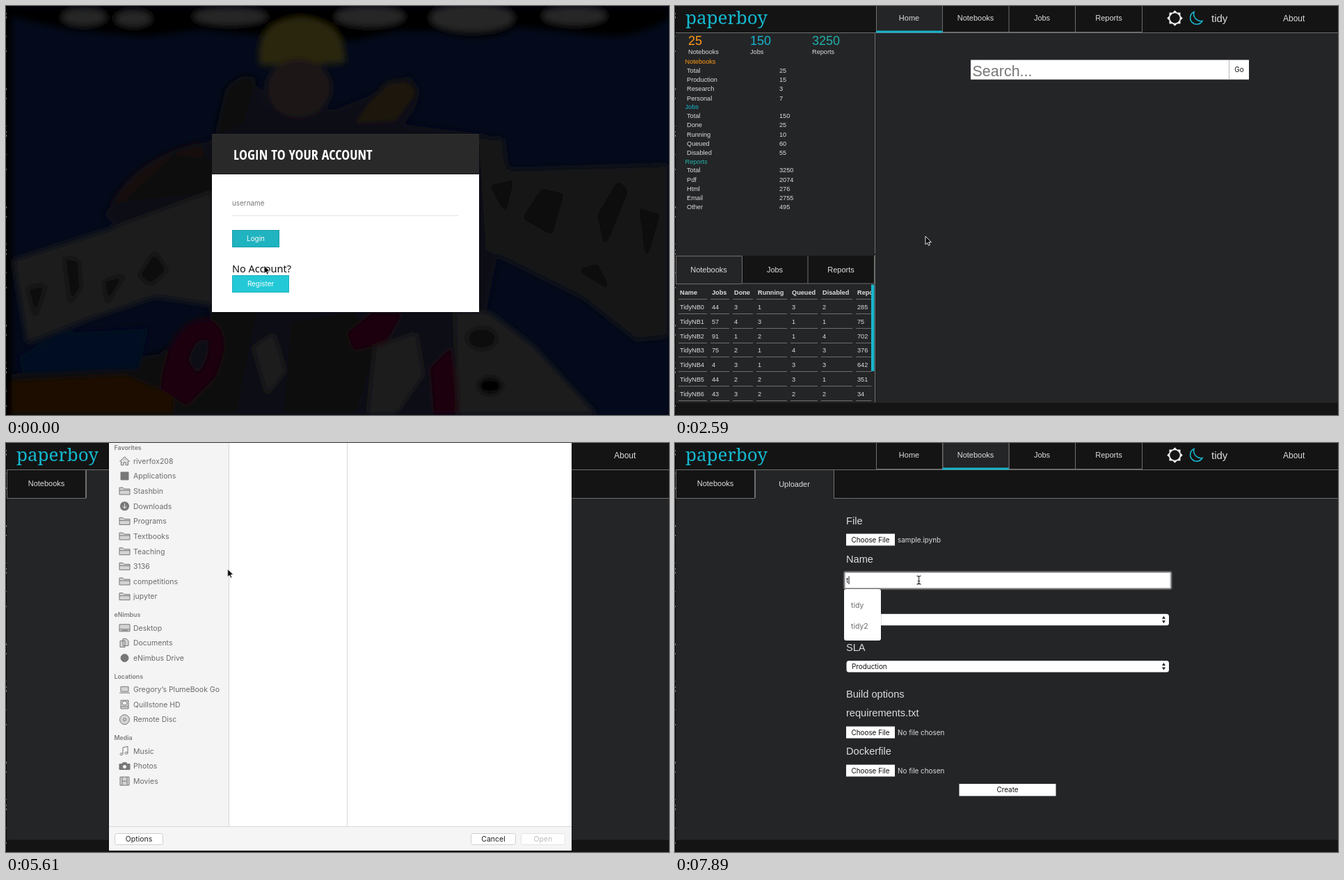
These frames come from a looping animation (953 px wide and 588 px high, 8000 ms). An HTML page:

```html
<!DOCTYPE html>
<html lang="en">
<head>
<meta charset="utf-8">
<title>Notebook uploader</title>
<style>
html, body { margin: 0; width: 100%; height: 100%; overflow: hidden; background: #242527; }
svg { display: block; width: 953px; height: 588px; }
text { font: 11px "Liberation Sans", Arial, sans-serif; fill: #ddd; }
.ui { font: 9.9px Inter, Roboto, sans-serif; fill: #111; }
.mid { text-anchor: middle; }
.end { text-anchor: end; }
.title { font: 300 20px "Open Sans Condensed", "Open Sans", sans-serif; font-stretch: 75%; fill: #fff; }
.ask { font: 14.5px "Noto Sans", "Open Sans", sans-serif; fill: #111; }
.brand { font: 500 26px "Noto Serif", serif; fill: #14b8d0; }
.s9 { font-size: 9.2px; }
.s15 { font-size: 14.6px; }
.side { font: 10.5px Inter, sans-serif; fill: #6b6b6b; }
.head { font: 600 8.8px Inter, sans-serif; fill: #7d7d7d; }
.file { font: 9.7px Inter, sans-serif; fill: #222; }
.code { font: 9.2px "DejaVu Sans Mono", monospace; fill: #111; }
.white { fill: #fff; }
.grey { fill: #777; }
.line { fill: none; stroke: #6e6e6e; }
.icon { fill: #d2d2d2; stroke: #777; stroke-width: 1; }

/* 1% = 80 ms; every change is a hard cut */
.a { animation: 8s step-end infinite; }
#login { animation-name: login; }
#register { animation-name: register; }
#filled { animation-name: filled; }
#hint { animation-name: hint; }
#app { animation-name: app; }
#home { animation-name: home; }
#notebooks { animation-name: notebooks; }
#tab { animation-name: tab; }
#subtab { animation-name: subtab; }
#form { animation-name: form; }
#ring { animation-name: ring; }
#nofile { animation-name: nofile; }
#picked { animation-name: picked; }
#typed { animation-name: typed; }
#sheet { animation-name: sheet; }
.loaded { animation-name: loaded; }
#cursor { animation-name: cursor; }
#arrow { animation-name: arrow; }
#beam { animation-name: beam; }
@keyframes login { 0% { opacity: 1 } 4.125%, to { opacity: 0 } }
@keyframes register { 0% { opacity: 0 } 4.125%, to { opacity: 1 } }
@keyframes filled { 0% { opacity: 0 } 15.25%, to { opacity: 1 } }
@keyframes hint { 0% { opacity: 0 } 13.5% { opacity: 1 } 19%, to { opacity: 0 } }
@keyframes app { 0% { opacity: 0 } 30.125%, to { opacity: 1 } }
@keyframes home { 0% { opacity: 1 } 42.375%, to { opacity: 0 } }
@keyframes notebooks { 0% { opacity: 0 } 42.375%, to { opacity: 1 } }
@keyframes tab { 0% { transform: none } 42.375%, to { transform: translate(95.5px, 0) } }
@keyframes subtab { 0% { transform: none } 55.5%, to { transform: translate(114px, 0) } }
@keyframes form { 0% { opacity: 0 } 55.5%, to { opacity: 1 } }
@keyframes ring { 0% { opacity: 0 } 64.625% { opacity: 1 } 98.625%, to { opacity: 0 } }
@keyframes nofile { 0% { opacity: 1 } 85.625%, to { opacity: 0 } }
@keyframes picked { 0% { opacity: 0 } 85.625%, to { opacity: 1 } }
@keyframes typed { 0% { opacity: 0 } 98.625%, to { opacity: 1 } }
@keyframes sheet {
  0% { transform: translate(0, -620px) }
  68.375% { transform: translate(0, -330px) }
  70.125% { transform: none }
  83.75% { transform: translate(0, -26.5px) }
  85.625%, to { transform: translate(0, -620px) }
}
@keyframes loaded { 0% { opacity: 0 } 72%, to { opacity: 1 } }
@keyframes arrow { 0% { opacity: 1 } 11.625% { opacity: 0 } 15.25% { opacity: 1 } 89.375%, to { opacity: 0 } }
@keyframes beam { 0% { opacity: 0 } 11.625% { opacity: 1 } 15.25% { opacity: 0 } 89.375%, to { opacity: 1 } }
@keyframes cursor {
  0% { transform: translate(371px, 373px) }
  1.875% { transform: translate(371px, 393px) }
  9.75% { transform: translate(364px, 345px) }
  11.625% { transform: translate(352px, 286px) }
  15.25% { transform: translate(348px, 320px) }
  20.875% { transform: translate(354px, 328px) }
  22.75% { transform: translate(359px, 333px) }
  26.375% { transform: translate(360px, 331px) }
  34.5% { transform: translate(372px, 262px) }
  36.625% { transform: translate(402px, 136px) }
  38.625% { transform: translate(426px, 40px) }
  40.5% { transform: translate(432px, 20px) }
  44.25% { transform: translate(402px, 28px) }
  46.125% { transform: translate(318px, 44px) }
  48.125% { transform: translate(236px, 54px) }
  50% { transform: translate(188px, 59px) }
  51.875% { transform: translate(174px, 61px) }
  57.375% { transform: translate(204px, 82px) }
  59.25% { transform: translate(256px, 124px) }
  61% { transform: translate(284px, 144px) }
  68.375% { transform: translate(301px, 162px) }
  70.125% { transform: translate(318.5px, 181px) }
  72% { transform: translate(326px, 186px) }
  73.875% { transform: translate(331px, 187px) }
  87.5% { transform: translate(338px, 190px) }
  89.375% { transform: translate(346px, 195px) }
  91.25%, to { transform: translate(350.5px, 197px) }
}
</style>
</head>
<body>
<svg viewBox="0 0 953 588">
<defs>
  <filter id="blur" x="-5%" y="-5%" width="110%" height="110%"><feGaussianBlur stdDeviation="5"/></filter>
  <filter id="glow" x="-10%" y="-60%" width="120%" height="220%"><feGaussianBlur stdDeviation="1"/></filter>
  <linearGradient id="dark" x2="0" y2="1"><stop stop-color="#7c7c7e"/><stop offset="1" stop-color="#5c5c5f"/></linearGradient>
  <clipPath id="tableClip"><path d="M1 400H282.500V570H1z"/></clipPath>
  <clipPath id="codeClip"><path d="M508 0H796V278H508z"/></clipPath>
  <g id="menu">
    <rect x="-.5" y="-.5" width="54" height="75" rx="3.500" fill="#000" opacity=".25"/>
    <rect width="53" height="74" rx="3" fill="#fff"/>
    <text class="side" x="10" y="26.700">tidy</text>
    <text class="side" x="10" y="56.700">tidy2</text>
  </g>
  <g id="card">
    <path d="M296 184h384v256H296z" fill="#fff"/>
    <path d="M296 184h384v58H296z" fill="#292929"/>
    <path d="M296 184.500h384" stroke="#343434"/>
    <path d="M296 241.500h384" stroke="#171114"/>
    <path d="M325 301.500h326" stroke="#e4e4e4"/>
    <text class="ui grey" x="325" y="286.500">username</text>
  </g>
  <g id="loginBtn">
    <path d="M325 0h68v25h-68z" fill="#20b3c0"/><path d="M325.500 .5h67v24h-67z" fill="none" stroke="#1a9fac"/>
    <text class="ui white mid" x="359" y="16.200">Login</text>
  </g>
  <g id="regBtn">
    <path d="M325 0h82v25h-82z" fill="#23c9d7"/><path d="M325.500 .5h81v24h-81z" fill="none" stroke="#1fb2bf"/>
    <text class="ui white mid" x="366" y="16.200">Register</text>
  </g>
</defs>

<!-- dim backdrop -->
<path d="M0 0h953v588H0z" fill="#040a1b"/>
<g filter="url(#blur)">
  <path d="M0 0H953V18Q900 50 850 42L735 30Q690 56 620 36L560 36 500 50 360 42 280 34 200 44 90 34 0 14z" fill="#040404"/>
  <g fill="#272727">
    <ellipse cx="112" cy="16" rx="32" ry="12"/><ellipse cx="183" cy="18" rx="26" ry="11"/>
    <ellipse cx="322" cy="15" rx="53" ry="12"/><ellipse cx="523" cy="15" rx="50" ry="14"/>
    <ellipse cx="670" cy="17" rx="60" ry="20"/><ellipse cx="817" cy="14" rx="46" ry="13"/>
  </g>
  <path d="M300 190 325 130Q360 90 375 140L470 150 520 130 580 100Q610 130 570 170L690 185 730 240 690 440 650 588H330L290 430 140 300 190 240z" fill="#0f1015"/>
  <path d="M300 185 315 120Q340 90 360 105L340 170z" fill="#080809"/>
  <path d="M365 85Q355 20 425 16 490 22 487 82L440 84z" fill="#292607"/>
  <ellipse cx="421" cy="118" rx="47" ry="42" fill="#1b1413"/>
  <path d="M500 168 545 112Q575 98 590 125L560 165z" fill="#1c1411"/>
  <path d="M150 285Q190 215 280 196L296 260z" fill="#17090c"/>
  <path d="M170 280 240 215 296 220V270z" fill="#0c0c11"/>
  <path d="M10 365 150 320 296 266V430L215 418 120 450 30 485z" fill="#1b1b1a"/>
  <path d="M83 360 105 366 108 405 92 430z M190 388 213 352 233 380 208 402z M30 405 58 400 42 450z M140 395 172 385 145 430z" fill="#070707"/>
  <path d="M680 190 715 190 720 235 953 228V475L905 480 830 420 690 350z" fill="#191918"/>
  <path d="M695 258 730 250 718 300z M770 262 802 270 785 330 742 305z M850 300 880 250 895 265 860 350z M910 290 940 300 920 370z M820 380 850 370 870 410z" fill="#090909"/>
  <path d="M0 530 95 520 220 500 300 440H360L330 588H0z" fill="#0d090a"/>
  <path d="M18 505 75 470 205 464 190 522 25 528z" fill="#050d20"/>
  <path d="M0 540 170 530 240 560V588H0z" fill="#1b0806"/>
  <path d="M222 550Q235 445 292 450 330 470 300 535L260 575z" fill="#1d0608"/>
  <path d="M262 510Q270 475 290 480 295 505 275 530z" fill="#080a12"/>
  <path d="M355 490 385 470 402 525 375 560z" fill="#1b1b1b"/>
  <path d="M410 455 500 440 530 500 500 588H400z" fill="#0a0a0b"/>
  <path d="M490 470 525 442 570 442 545 485 500 495z M610 520 640 490 655 588H615z" fill="#1c0507"/>
  <path d="M530 490 590 470 600 530 560 588H520z" fill="#1d1d1c"/>
  <path d="M645 440H695L760 490 850 588H650z" fill="#1c1c1b"/>
  <ellipse cx="696" cy="546" rx="17" ry="12" fill="#050505"/><ellipse cx="684" cy="478" rx="22" ry="16" fill="#0b0b0b"/>
  <path d="M-10-10H8V600H-10z" fill="#020204"/>
</g>

<g id="login" class="a">
  <use href="#card"/>
  <text class="title" x="327" y="221">LOGIN TO YOUR ACCOUNT</text>
  <use href="#loginBtn" y="322"/>
  <text class="ask" x="325" y="383">No Account?</text>
  <use href="#regBtn" y="387"/>
</g>
<g id="register" class="a">
  <use href="#card"/>
  <text class="title" x="327" y="221">REGISTER</text>
  <g id="filled" class="a">
    <path d="M325 272h324.500v29H325z" fill="#f9fdbb"/>
    <text class="ui" x="325" y="286.500">tidy</text>
  </g>
  <use href="#regBtn" y="322"/>
  <text class="ask" x="325" y="383">Already have an account?</text>
  <use href="#loginBtn" y="387"/>
  <g id="hint" class="a"><use href="#menu" x="324" y="303"/></g>
</g>

<g id="app" class="a">
  <path d="M0 0h953v588H0z" fill="#242527"/>
  <path d="M0 0h953v38H0zM0 570.500h953V588H0z" fill="#141414"/>
  <path class="line" d="M1 38.500H953M289.500 0V37.500H671.500V0M384.500 0V37M480 0V37M575.500 0V37"/>
  <g id="tab" class="a">
    <path d="M290 0h94v37h-94z" fill="#242527"/><path d="M289.500 0V37M384.500 0V37" class="line"/>
    <path d="M289 35.500h95.500v3H289z" fill="#18b5cc"/>
  </g>
  <text class="brand" x="15" y="25.500">paperboy</text>
  <g class="mid">
    <text x="336.500" y="21">Home</text><text x="432" y="21">Notebooks</text>
    <text x="527.500" y="21">Jobs</text><text x="623.500" y="21">Reports</text>
  </g>
  <g transform="translate(718.500 17.500)" fill="#eee" fill-rule="evenodd">
    <path d="M0-11.300 3.300-8H8v4.700L11.300 0 8 3.300V8H3.300L0 11.300-3.300 8H-8V3.300L-11.300 0-8-3.300V-8h4.700zM-7.200 0a7.200 7.200 0 1 0 14.400 0 7.200 7.200 0 1 0-14.400 0z"/>
  </g>
  <path d="M746 8.500A9.300 9.300 0 1 0 758 21.500 10.500 10.500 0 0 1 746 8.500z" fill="none" stroke="#18b5cc" stroke-width="1.600"/>
  <text x="771" y="22.500" style="font-size:15px">tidy</text>
  <text x="874" y="21.500" style="font-size:12px">About</text>

  <g id="home" class="a">
    <path class="line" d="M287.500 39V356M287.500 358V570"/>
    <g id="stats"></g>
    <path d="M1 359h286v40.500H1z" fill="#141414"/>
    <path d="M1 359h95v41H1z" fill="#242527"/>
    <path class="line" d="M1.500 399V359.500H96.500V399H286.500V359M191 359V399M1 399.500H96"/>
    <g class="mid">
      <text x="48.500" y="383">Notebooks</text><text x="143.500" y="382.500">Jobs</text><text x="238.500" y="382.500">Reports</text>
    </g>
    <g id="table" clip-path="url(#tableClip)"></g>
    <path d="M282 400.500h4.500V525H282z" fill="#18b5cc"/>
    <path d="M425 77.500h400V105.500H425z" fill="#fff"/>
    <path d="M796.500 78V105.500M425 105.500H825" stroke="#b5b5b5"/>
    <text class="grey" x="427.500" y="101" style="font-size:21.500px">Search...</text>
    <text class="ui mid" x="811" y="95">Go</text>
  </g>

  <g id="notebooks" class="a">
    <path d="M1 39h952v40H1z" fill="#141414"/>
    <path class="line" d="M1.500 39V79.500H953M114.500 39V79M228.500 39V79"/>
    <g id="subtab" class="a">
      <path d="M1 39h113v42H1z" fill="#242527"/><path class="line" d="M1.500 39V79M114.500 39V79"/>
    </g>
    <g class="mid"><text x="58" y="61.800">Notebooks</text><text x="171.500" y="62.500">Uploader</text></g>
    <g id="form" class="a">
      <g id="ring" class="a"><rect x="244.500" y="128.500" width="73.500" height="21" rx="2" fill="#8a8a8a" filter="url(#glow)"/></g>
      <g id="fields"></g>
      <text id="nofile" class="ui a" x="320" y="142.700" style="fill:#ddd">No file chosen</text>
      <text id="picked" class="ui a" x="320" y="142.700" style="fill:#ddd">sample.ipynb</text>
      <path d="M244 186h468.500v23H244z" fill="#fff"/><path d="M244 208.500h468.500" stroke="#bbb"/>
      <text class="ui grey" x="246" y="200.700">Name for Notebook...</text>
      <g id="typed" class="a">
        <rect x="243" y="185" width="470.500" height="25" rx="1" fill="#b5b5b5" filter="url(#glow)"/>
        <path d="M245 187h466.500v21H245z" fill="#fff"/>
        <text class="ui" x="246" y="200.700">t</text><path d="M250 191.500V203" stroke="#111"/>
        <use href="#menu" x="243" y="210"/>
      </g>
    </g>
  </g>
</g>

<g id="sheet" class="a">
  <path d="M147-40H814V587H147z" fill="#000" opacity=".35"/>
  <path d="M148-40H813V586H148z" fill="#fff"/>
  <path d="M148-40H320V551H148z" fill="#f4f4f4"/>
  <path class="a loaded" d="M148-40H320V551H148z" fill="#e3e7e7"/>
  <path d="M148 551H813V586H148z" fill="#f5f5f5"/>
  <path d="M148 551.500H813M320.500-40V551M490.500-40V551" stroke="#d8d8d8"/>
  <g id="side"></g>
  <g fill="#fff" stroke="#cfcfcf">
    <rect x="156.500" y="561.500" width="69" height="16" rx="3"/><rect x="668.500" y="561.500" width="64" height="16" rx="3"/>
    <rect x="740.500" y="561.500" width="63" height="16" rx="3" stroke="#e2e2e2"/>
  </g>
  <g class="mid">
    <text class="side" x="191" y="573.300" style="fill:#222">Options</text>
    <text class="side" x="700.500" y="573.300" style="fill:#222">Cancel</text>
    <text class="side" x="772" y="573.300" style="fill:#bbb">Open</text>
  </g>
  <g class="a loaded">
    <rect x="740" y="561" width="64" height="17" rx="3" fill="url(#dark)"/>
    <text class="side mid white" x="772" y="573.300">Open</text>
    <path d="M162 61h17v16h-17z" fill="#e3e7e7"/><path d="M165 63.500h11v11h-11z" fill="#777"/>
    <g id="files"></g>
    <path d="M508.500-40V278.500H795.500V-40" fill="none" stroke="#c4c4c4"/>
    <g id="code" clip-path="url(#codeClip)"></g>
    <text class="file mid" x="652" y="314.500" style="font-size:12.600px">sample.ipynb</text>
    <text class="file mid" x="652" y="331" style="font-weight:500;fill:#8a8a8a">Limpid Text Document - 214 KB</text>
    <g id="info"></g>
  </g>
</g>

<path d="M0 0h1v588H0z" fill="#050505"/>
<path d="M.5 10V588" stroke="#777" stroke-dasharray="2 3 3 25 1 20 2 52 3 11 2 38 1 7"/>

<g id="cursor" class="a">
  <path id="arrow" class="a" d="M0 0V11.800L2.700 9.300 4.400 13.300 6.400 12.400 4.700 8.500H8.300z" fill="#000" stroke="#fff" stroke-width=".9"/>
  <path id="beam" class="a" d="M-3-6Q0-6 0-4 0-6 3-6M0-4V4M-3 6Q0 6 0 4 0 6 3 6M-1.500 1.500h3" fill="none" stroke="#111" stroke-width="1.100"/>
</g>
</svg>

<script>
const put = (id, html) => document.getElementById(id).innerHTML = html;
const text = (x, y, s, cls = "", style = "") => `<text x="${x}" y="${y}" class="${cls}" style="${style}">${s}</text>`;
const path = (d, attrs) => `<path d="${d}" ${attrs}/>`;

// summary panel
const groups = [
  ["Notebooks", "#ff9a16", 19, 83, "Total 25 Production 15 Research 3 Personal 7"],
  ["Jobs", "#18b5cc", 108, 148.200, "Total 150 Done 25 Running 10 Queued 60 Disabled 55"],
  ["Reports", "#22b0aa", 197, 226.500, "Total 3250 Pdf 2074 Html 276 Email 2755 Other 495"]
];
put("stats", groups.map(([name, color, x, y, list]) => {
  const words = list.split(" ");
  let out = text(x, 56, words[1], "", `font-size:18px;fill:${color}`) + text(x, 69.300, name, "s9")
    + text(14.500, y, name, "s9", `fill:${color}`);
  for (let i = 0; i < words.length; i += 2) {
    const row = y + 12.700 + i / 2 * 13.300;
    out += text(17, row, words[i], "s9") + text(150, row, words[i + 1], "s9");
  }
  return out;
}).join(""));

// notebook table
const cols = [7, 53, 85, 119, 168, 212, 262, 306];
const rows = ["Name Jobs Done Running Queued Disabled Reports", "44 3 1 3 2 285", "57 4 3 1 1 75",
  "91 1 2 1 4 702", "75 2 1 4 3 376", "4 3 1 3 3 642", "44 2 2 3 1 351", "43 3 2 2 2 34"];
put("table", rows.map((row, i) => {
  const cells = (i ? `TidyNB${i - 1} ` : "") + row;
  const y = 415.200 + i * 20.800;
  return cells.split(" ").map((s, c) => text(cols[c], y, s, "s9", i ? "" : "font-weight:bold")
    + path(`M${cols[c] - 2} ${Math.round(y + 6) + .5}H${cols[c + 1] - 7}`, 'class="line"')).join("");
}).join(""));

// upload form
const labels = [[117, "File"], [172, "Name"], [232, "Privacy"], [299, "SLA"],
  [366, "Build options"], [393, "requirements.txt"], [448, "Dockerfile"]];
const chooser = y => path(`M246 ${y}h70v17h-70z`, 'fill="#fff"') + text(281, y + 12.200, "Choose File", "ui mid")
  + (y > 200 ? text(320, y + 12.200, "No file chosen", "ui", "fill:#ddd") : "");
const select = (y, s) => `<rect x="246.500" y="${y}" width="463.500" height="16.500" rx="3.500" fill="#fff"/>`
  + text(254, y + 11.700, s, "ui") + path(`M700 ${y + 7}l2.500-4 2.500 4zM700 ${y + 9.500}l2.500 4 2.500-4z`, 'fill="#222"');
put("fields", labels.map(([y, s]) => text(246, y, s, "s15")).join("")
  + [130.500, 407.500, 462.500].map(chooser).join("") + select(245.700, "Private") + select(313, "Production")
  + path("M408.500 490h139v17.500h-139z", 'fill="#fff"') + text(478, 502.300, "Create", "ui mid"));

// file dialog sidebar
const icons = {
  folder: "M0-5h5l2 2h8v8H0zM0-1h15",
  home: "M0 1 7.500-6 15 1M2.500 0v6H6V2h3v4h3.500V0",
  square: "M2-5.500h11v11H2z",
  down: "M.5 0a7 7 0 1 0 14 0 7 7 0 1 0-14 0zM7.500-4V3M4.500 0l3 3.500 3-3.500",
  desk: "M0-5h15V5H0zM0 2h15M3 3.500h9",
  doc: "M1-3h7V6H1zM5-6h5l3 3v7H5z",
  circle: "M2 0a5.500 5.500 0 1 0 11 0 5.500 5.500 0 1 0-11 0z",
  laptop: "M2-4h11v7H2zM0 5h15",
  drive: "M2-6h11V6H2zM4-2a3.500 3 0 1 0 7 0 3.500 3 0 1 0-7 0zM2 3h11",
  disc: "M.5 0a7 7 0 1 0 14 0 7 7 0 1 0-14 0zM5.500 0a2 2 0 1 0 4 0 2 2 0 1 0-4 0z",
  note: "M5 4V-5l7-1.500V3M1 4.500a2 1.500 0 1 0 4 0 2 1.500 0 1 0-4 0zM8 3a2 1.500 0 1 0 4 0 2 1.500 0 1 0-4 0z",
  camera: "M0-3h4l1-2h5l1 2h4v8H0zM4.500 1a3 3 0 1 0 6 0 3 3 0 1 0-6 0z",
  film: "M1-6h13V6H1zM4-6V6M11-6V6M4 0h7"
};
const solid = ["down", "square", "circle", "note", "camera"];
const places = [
  [7, "Favorites", "home:riverfox208,square:Applications,folder:Stashbin,down:Downloads,folder:Programs,folder:Textbooks,folder:Teaching,folder:3136,folder:competitions,folder:jupyter"],
  [247, "eNimbus", "desk:Desktop,doc:Documents,circle:eNimbus Drive"],
  [335.500, "Locations", "laptop:Gregory’s PlumeBook Go,drive:Quillstone HD,disc:Remote Disc"],
  [424, "Media", "note:Music,camera:Photos,film:Movies"]
];
put("side", places.map(([top, name, list]) => text(155.500, top + 3.200, name, "head")
  + list.split(",").map((item, i) => {
    const [kind, label] = item.split(":"), y = top + 18.800 + i * 21.650;
    const fill = kind === "note" ? "none" : solid.includes(kind) ? "#777" : "#d4d4d4";
    const stroke = kind === "down" ? "#eee" : "#777";
    return path(icons[kind], `class="icon" transform="translate(163 ${y})" style="fill:${fill};stroke:${stroke}"`)
      + text(183, y + 3.800, label, "side");
  }).join("")).join(""));

// file list
const files = ("config/ dask-worker-space/ db/ dist/ docs/ LICENSE logfile Makefile MANIFEST.in node_modules/ "
  + "package-lock.json package.json paperboy/ paperboy.egg-info/ Procfile README.md requirements.txt sample.ipynb "
  + "scripts/ setup.cfg setup.py specs/ ts/ tsconfig.json webpack.config.js").split(" ");
const marks = { json: "#2b83c9", md: "#1b93c4", cfg: "#9cc49a", py: "#4a4a4a", js: "#4a4a4a" };
put("files", files.map((name, i) => {
  const y = 32.500 + i * 15, dir = name.endsWith("/"), on = name === "sample.ipynb";
  let out = on ? path(`M321 ${y - 7.500}h169v15H321z`, 'fill="#0a5bd3"') : "";
  if (dir) out += path(`M326 ${y - 5}h5l1.500 1.500h6.500v8.500h-13z`, 'fill="#69c0ee"')
    + path(`M484 ${y - 3}l5 3-5 3z`, 'fill="#777"');
  else {
    out += path(`M328 ${y - 6}h6.500l3 3v9h-9.500z`, 'fill="#fff" stroke="#c8c8c8" stroke-width=".7"');
    const mark = marks[name.split(".").pop()];
    if (mark) out += path(`M329.500 ${y - 3}h7v7h-7z`, `fill="${mark}"`);
  }
  return out + text(344, y + 3.500, name.replace("/", ""), on ? "file white" : "file");
}).join(""));

// preview
const code = `{
 "cells": [
  {
   "cell_type": "code",
   "execution_count": 1,
   "metadata": {
    "tags": [
     "parameters"
    ]
   },
   "outputs": [],
   "source": [
    "ticker = 'qvzn'"
   ]
  },
  {
   "cell_type": "code",
   "execution_count": 40,
   "metadata": {},
   "outputs": [
    {
     "data": {
      "text/html": [
       "&lt;h1>Report for QVZN&lt;/h1>"
      ]`.split("\n");
put("code", code.map((s, i) => text(514.500 + s.search(/\S/) * 5.540, 22 + i * 10.830, s.trim(), "code")).join(""));
put("info", [["Tags", "Add Tags..."], ["Created", "Yesterday, 5:15 PM"], ["Modified", "Yesterday, 5:23 PM"]]
  .map(([k, v], i) => text(633, 362 + i * 15, k, "file end", "font-weight:500;fill:#8a8a8a")
    + text(640, 362 + i * 15, v, "file", i ? "" : "fill:#bbb")).join(""));
</script>
</body>
</html>
```
